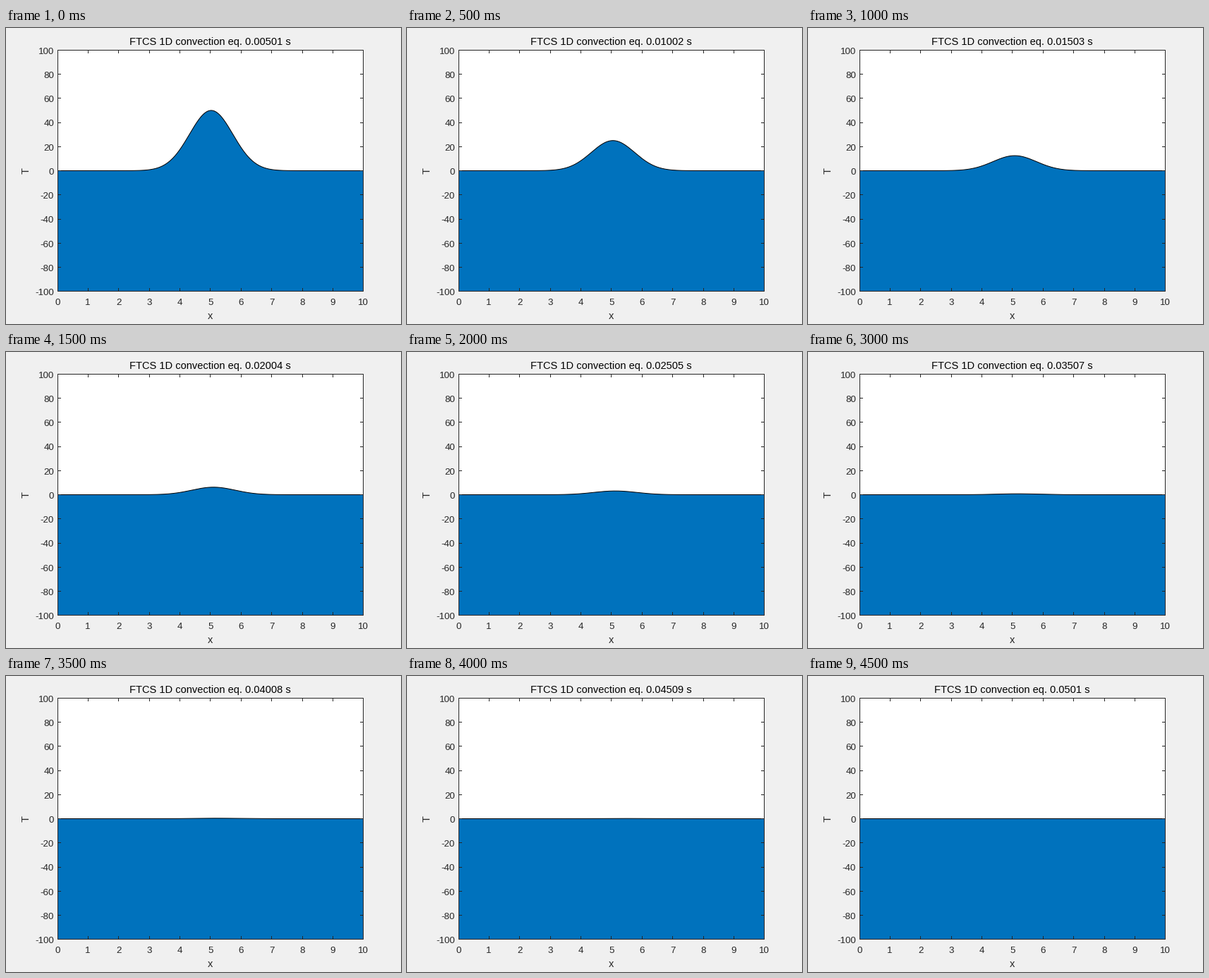
A matplotlib script that plays this animation: 560x420 px, repeating every 5 s.

```python
import numpy as np
import matplotlib.pyplot as plt
from matplotlib.animation import FuncAnimation
from matplotlib.patches import Polygon, Rectangle

W, H, DPI = 560, 420, 100
PX = 72 / DPI                      # points per pixel
LEFT, RIGHT, TOP, BOTTOM = 73.5, 506.5, 31.5, 373.5
X0, X_UNIT = 72.8, 43.4            # pixel of x = 0, pixels per x unit
ZERO, T_UNIT = 202.5, 1.7115       # pixel of T = 0, pixels per T unit
INK = "#262626"
TICK = 4.5
DT = 0.00501
SPEED = 5
FRAMES = 10

plt.rcParams["font.family"] = "Liberation Sans"
fig = plt.figure(figsize=(W / DPI, H / DPI), dpi=DPI, facecolor="#f0f0f0")
ax = fig.add_axes([0, 0, 1, 1])
ax.set_xlim(0, W)
ax.set_ylim(H, 0)
ax.axis("off")


def line(xs, ys, color=INK, z=4):
    return ax.plot(xs, ys, color=color, lw=PX, solid_capstyle="butt",
                   snap=False, zorder=z)[0]


def box(z, **style):
    ax.add_patch(Rectangle((LEFT, TOP), RIGHT - LEFT, BOTTOM - TOP,
                           lw=PX, snap=False, zorder=z, **style))


def label(x, y, text, size, color=INK, ha="center", rotation=0):
    return ax.text(x, y, text, fontsize=size * PX, color=color, ha=ha,
                   va="baseline", rotation=rotation, rotation_mode="anchor")


box(1, facecolor="white", edgecolor="none")
box(4, facecolor="none", edgecolor=INK, joinstyle="miter")

for n in range(11):
    x = X0 + n * X_UNIT
    px = np.clip(np.floor(x) + 0.5, LEFT, RIGHT)
    line([px, px], [TOP, TOP + TICK])
    line([px, px], [BOTTOM, BOTTOM - TICK])
    label(x, 393, str(n), 13.33)

    y = TOP + n * 20 * T_UNIT
    py = np.floor(y) + 0.5
    line([LEFT, LEFT + TICK], [py, py])
    line([RIGHT, RIGHT - TICK], [py, py])
    label(68, round(y + 5.3), str(100 - 20 * n), 13.33, ha="right")

label(290, 413, "x", 14.67)
label(33, 202.5, "T", 14.67, rotation=90)
title = label(289.5, 24, "", 14.67, color="black")

curve_x = np.linspace(LEFT, RIGHT, 401)
area = Polygon([(LEFT, BOTTOM), (RIGHT, BOTTOM), (RIGHT, ZERO)], closed=True,
               facecolor="#0072bd", edgecolor="none", snap=False, zorder=2)
ax.add_patch(area)
curve = line(curve_x, np.full_like(curve_x, ZERO), color="black", z=3)


def update(k):
    # The pulse halves at every step while drifting slowly to the right.
    time = DT * (k + 1)
    x = (curve_x - X0) / X_UNIT
    temp = 50 * 0.5 ** k * np.exp(-(x - 5 - SPEED * time) ** 2)
    top = ZERO - T_UNIT * temp
    area.set_xy(np.vstack([[LEFT, BOTTOM], np.column_stack([curve_x, top]),
                           [RIGHT, BOTTOM]]))
    curve.set_ydata(top)
    title.set_text(f"FTCS 1D convection eq. {time:.4g} s")
    return area, curve, title


anim = FuncAnimation(fig, update, frames=FRAMES, interval=500,
                     repeat=True, repeat_delay=0, blit=False)
plt.show()
```
